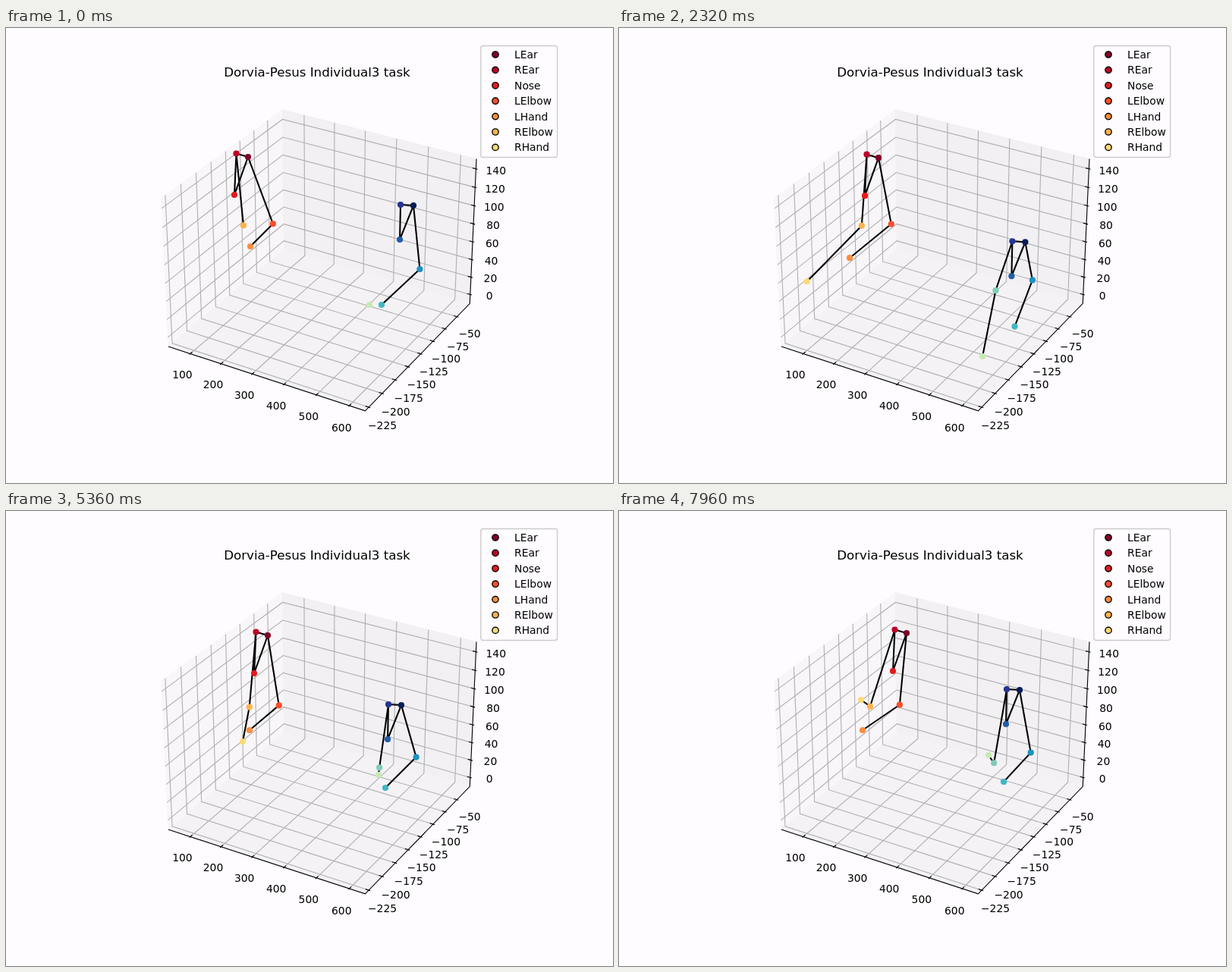
These frames come from a looping animation (800x600 px, 8000 ms). An HTML page:

```html
<!DOCTYPE html>
<html lang="en">
<head>
<meta charset="utf-8">
<title>3D pose plot</title>
<style>
  html, body { margin: 0; width: 100%; height: 100%; overflow: hidden; background: #fefcff; }
  svg { display: block; width: 800px; height: 600px; font-family: "DejaVu Sans", sans-serif; }
</style>
</head>
<body>
<svg id="stage" viewBox="0 0 800 600"></svg>
<script>
const stage = document.getElementById('stage');
const joints = ['LEar', 'REar', 'Nose', 'LElbow', 'LHand', 'RElbow', 'RHand'];
const bones = [[0, 1], [0, 2], [1, 2], [0, 3], [3, 4], [1, 5], [5, 6]];
const warm = ['#800026', '#bd0026', '#e31a1c', '#fc4e2a', '#fd8d3c', '#feb24c', '#fed976'];
const cool = ['#081d58', '#253494', '#225ea8', '#1d91c0', '#41b6c4', '#7fcdbb', '#c7e9b4'];

function add(tag, attrs, text = '') {
  const el = document.createElementNS('http://www.w3.org/2000/svg', tag);
  for (const key in attrs) el.setAttribute(key, attrs[key]);
  el.textContent = text;
  return stage.appendChild(el);
}
const label = (x, y, text, anchor = 'middle', size = 13.889) =>
  add('text', { x, y, 'text-anchor': anchor, 'font-size': size }, text);

// Perspective view of a box spanning -1..1 on each axis, elevation 30, azimuth -60
function project([x, y, z]) {
  const a = 0.5952 * x, b = 0.5952 * y, c = 0.4464 * z;
  const k = 2497.3 / (10 - 0.433 * a + 0.75 * b - 0.5 * c);
  return [416.24 + k * (0.866 * a + 0.5 * b), 296.76 - k * (-0.25 * a + 0.433 * b + 0.866 * c)];
}
const polyline = (points, stroke, fill = 'none') =>
  add('path', { d: 'M' + points.map(project).join('L'), stroke, fill, 'stroke-width': 1.11 });

// Each pane is the face where one coordinate is fixed
const square = [[-1, -1], [1, -1], [1, 1], [-1, 1], [-1, -1]];
polyline(square.map(([u, v]) => [-1, u, v]), '#f8f6f9', '#f8f6f9');
polyline(square.map(([u, v]) => [u, 1, v]), '#f2f0f3', '#f2f0f3');
polyline(square.map(([u, v]) => [u, v, -1]), '#f4f2f5', '#f4f2f5');

// Tick i has the value first + i * step and lies at from + i * gap; ticks point along `out`
const axes = [
  { first: 100, step: 100, count: 6, from: -0.766, gap: 0.3225, out: 1,
    grid: v => [[v, -1, -1], [v, 1, -1], [v, 1, 1]] },
  { first: -225, step: 25, count: 8, from: -0.938, gap: 0.239, out: 0,
    grid: v => [[1, v, -1], [-1, v, -1], [-1, v, 1]] },
  { first: 0, step: 20, count: 8, from: -0.87, gap: 0.2483, out: 0,
    grid: v => [[1, 1, v], [-1, 1, v], [-1, -1, v]] }
];
const eachTick = fn => axes.forEach((axis, own) => {
  for (let i = 0; i < axis.count; i++) fn(axis.grid(axis.from + axis.gap * i), axis, own, i);
});
eachTick(line => polyline(line, '#b0b0b0'));
polyline([[-1, -1, -1], [1, -1, -1], [1, 1, -1], [1, 1, 1]], '#000');
eachTick(([edge], axis, own, i) => {
  polyline([0.968, 1.016].map(s => edge.map((c, k) => k === axis.out ? c * s : c)), '#000');
  const [x, y] = project(edge.map((c, k) => k === own ? c : c * 1.1328));
  label(x, y + 10.5, String(axis.first + axis.step * i).replace('-', '\u2212'));
});

label(410, 64, 'Dorvia-Pesus Individual3 task', 'middle', 16.667);

// Legend
add('rect', { x: 625.8, y: 23.5, width: 100.8, height: 147, rx: 3,
  fill: '#fefcff', stroke: '#ccc', 'stroke-width': 1.39 });
joints.forEach((name, i) => {
  const cy = 35 + 20.4 * i;
  add('circle', { cx: 645, cy, r: 4.17, fill: warm[i], stroke: '#000', 'stroke-width': 1.39 });
  label(670, cy + 5, name, 'start');
});

// Tracks are key points [step, x, y]; every elbow stays between its rest on the desk and the ear
const people = [
  {
    colors: warm, late: 6, toREar: [-15.5, -4.5], toNose: [-18, 50],
    restL: [366, 296], restR: [317, 301],
    ear: [[0, 319, 170], [29, 351, 165], [72, 325, 183], [107, 345, 164], [126, 363, 196], [159, 379, 161]],
    handL: [[29, 322, 288], [72, 270, 332], [107, 321, 289]],
    handR: [[14, 238, 325], [29, 303, 327], [50, 242, 335], [64, 266, 341],
      [80, 235, 327], [107, 312, 304], [126, 293, 320], [159, 319, 249]]
  },
  {
    colors: cool, late: 5, toREar: [-17, -1], toNose: [-18, 45],
    restL: [549, 354], restR: [487, 374],
    ear: [[0, 537, 234], [29, 544, 299], [64, 526, 264], [80, 513, 267], [107, 521, 256], [126, 528, 236]],
    handL: [[17, 495, 365], [29, 535, 386], [72, 496, 408], [107, 500, 365], [126, 507, 357]],
    handR: [[17, 479, 365], [32, 473, 454], [50, 480, 430], [64, 494, 380],
      [80, 485, 392], [107, 491, 348], [126, 487, 322]]
  }
];
for (const person of people) {
  person.path = add('path', { fill: 'none', stroke: '#000', 'stroke-width': 2.08, 'stroke-linejoin': 'round' });
  person.dots = person.colors.map(fill => add('circle', { r: 4.1, fill }));
}

const plus = (p, q) => [p[0] + q[0], p[1] + q[1]];
const mix = (p, q, u) => p.map((v, k) => v + (q[k] - v) * u);

function locate(track, step) {
  const i = track.findIndex(key => key[0] > step);
  if (i < 0) return track[track.length - 1].slice(1);
  if (i === 0) return track[0].slice(1);
  const [a, b] = [track[i - 1], track[i]];
  const u = (step - a[0]) / (b[0] - a[0]);
  return mix(a.slice(1), b.slice(1), u * u * (3 - 2 * u));
}

function poseAt(person, step) {
  const earL = locate(person.ear, step);
  const earR = plus(earL, person.toREar);
  const pose = [
    earL, earR, plus(earL, person.toNose),
    mix(person.restL, earL, 0.3), locate(person.handL, step),
    mix(person.restR, earR, 0.3), locate(person.handR, step)
  ];
  if (step < 6) pose[person.late] = null; // this joint is picked up a little later
  return pose;
}

function draw(now) {
  const step = Math.min(159, Math.floor((now % 8000 + 19) / 50));
  for (const person of people) {
    const pose = poseAt(person, step);
    person.path.setAttribute('d', bones.filter(([a, b]) => pose[a] && pose[b])
      .map(([a, b]) => `M${pose[a]}L${pose[b]}`).join(''));
    person.dots.forEach((dot, j) => {
      dot.setAttribute('visibility', pose[j] ? 'visible' : 'hidden');
      if (!pose[j]) return;
      dot.setAttribute('cx', pose[j][0]);
      dot.setAttribute('cy', pose[j][1]);
    });
  }
}

const start = performance.now();
function loop() {
  draw(performance.now() - start);
  requestAnimationFrame(loop);
}
loop();
</script>
</body>
</html>
```
